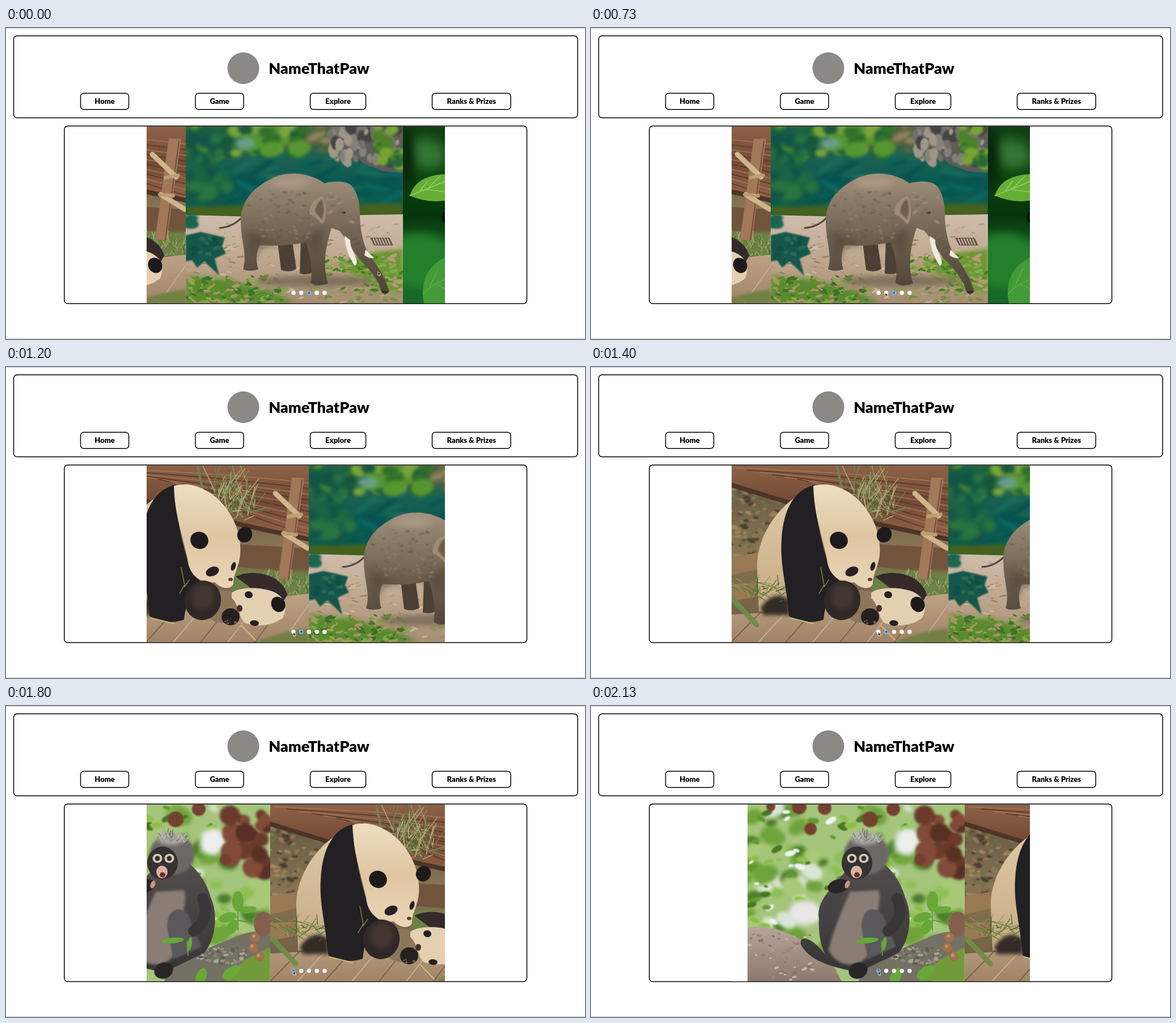
An HTML page with a canvas that plays this animation: 1021x549 px, repeating every 2.19 s.

```html
<!DOCTYPE html>
<html lang="en">
<head>
<meta charset="utf-8">
<title>NameThatPaw</title>
<style>
  html, body { margin: 0; width: 100%; height: 100%; overflow: hidden; background: #fff; }
  svg, canvas { position: absolute; left: 0; top: 0; }
  canvas { left: 248px; top: 174px; }
  .box { fill: #fff; stroke: #000; stroke-width: 1.5; }
  text { font: 900 13px Lato, sans-serif; text-anchor: middle; }
  .title { font-size: 27px; }
</style>
</head>
<body>
<svg width="1021" height="549">
  <path d="M0 .5H1021M0 548.5H1021" stroke="#c4c4c4"/>
  <rect class="box" x="13.5" y="13.8" width="994.5" height="144.7" rx="6"/>
  <circle cx="418.5" cy="71" r="28" fill="#8b8985"/>
  <text class="title" x="552" y="81">NameThatPaw</text>
  <g id="nav"></g>
  <rect class="box" x="102.8" y="173" width="815.7" height="313.5" rx="6"/>
</svg>
<canvas id="stage" width="526" height="312"></canvas>
<svg width="1021" height="549">
  <g id="dots"></g>
  <path id="cursor" d="M0 0V7L1.7 5.5 2.8 8 4 7.4 2.9 5H5Z" fill="#111" stroke="#fff" stroke-width=".8"/>
</svg>
<script>
const LOOP = 2190, STEP = 200 / 3, SLIDE_W = 383, TOP = 174;
const $ = id => document.getElementById(id);

$("nav").innerHTML = [["Home", 131.5, 85], ["Game", 334, 85], ["Explore", 536.5, 98], ["Ranks &amp; Prizes", 751.5, 138.5]]
  .map(([label, x, w]) => `<rect class="box" x="${x}" y="115.2" width="${w}" height="28.6" rx="5.5"/>
    <text x="${x + w / 2}" y="134">${label}</text>`).join("");

function randomFrom(seed) {
  return () => (seed = (seed * 16807) % 2147483647) / 2147483647;
}

// Paints one slide in stage coordinates and returns it as an image.
function slide(left, paint) {
  const image = document.createElement("canvas");
  image.width = SLIDE_W;
  image.height = 312;
  const g = image.getContext("2d"), rnd = randomFrom(left * 97);
  g.translate(-left, -TOP);
  g.lineCap = "round";
  const between = (a, b) => a + rnd() * (b - a);
  const blur = px => g.filter = px ? `blur(${px}px)` : "none";
  const p = {
    fill(color, d, soft = 0) { blur(soft); g.fillStyle = color; g.fill(new Path2D(d)); },
    line(color, width, d) { blur(0); g.strokeStyle = color; g.lineWidth = width; g.stroke(new Path2D(d)); },
    oval(color, x, y, rx, ry = rx, turn = 0, soft = 0) {
      blur(soft);
      g.fillStyle = color;
      g.beginPath();
      g.ellipse(x, y, rx, ry, turn, 0, 7);
      g.fill();
    },
    fade(y0, y1, ...colors) {
      const gradient = g.createLinearGradient(0, y0, 0, y1);
      colors.forEach((c, i) => gradient.addColorStop(i / (colors.length - 1), c));
      return gradient;
    },
    specks(n, [x0, y0, x1, y1], size, flat, colors, soft = 0) {
      for (let i = 0; i < n; i++) {
        const r = between(size / 3, size);
        p.oval(colors[i % colors.length], between(x0, x1), between(y0, y1), r, r * flat, between(-.6, .6), soft);
      }
    },
    blades(n, [x0, y0, x1, y1], dx, dy, colors) {
      for (let i = 0; i < n; i++)
        p.line(colors[i % colors.length], between(.7, 2),
          `M${between(x0, x1)} ${between(y0, y1)}l${between(-dx, dx)} ${between(-dy, 0)}`);
    }
  };
  paint(p);
  return image;
}

const monkey = slide(274, p => {
  p.fill("#a5c57c", "M274 174H657V486H274Z");
  p.specks(110, [274, 180, 657, 440], 24, .7, ["#6fa33c", "#8fbf52", "#d9e6d4", "#4c7f2a", "#a8c978"], 3);
  p.specks(80, [274, 178, 580, 390], 11, .5, ["#5f9a2e", "#8cc048", "#eef3ee", "#477824"], 1);
  p.oval("#eceeec", 555, 240, 22, 24, .4, 4);
  p.oval("#e8e6e6", 375, 365, 28, 22, 0, 4);
  p.specks(26, [580, 180, 655, 300], 20, 1, ["#6b3a2c", "#824a38", "#593024"], 2);
  [[385, 217, 11], [490, 200, 14], [531, 182, 12], [365, 178, 13], [410, 180, 12], [578, 271, 10], [315, 178, 8]]
    .forEach(([x, y, r]) => p.oval("#74402f", x, y, r, r, 0, 1));
  p.fill(p.fade(385, 486, "#b8a79b", "#8d786c"), "M274 392C320 378 390 420 424 455L440 486H274Z");
  p.specks(50, [278, 402, 390, 484], 5, .5, ["#9a887d", "#c5b6aa", "#87756b"]);
  p.fill("#747064", "M470 486L476 462Q550 425 595 408Q630 392 657 402V430L600 486Z");
  p.specks(60, [530, 425, 625, 455], 5, .5, ["#8f8a7b", "#5e5b50", "#aaa596"]);
  p.fill("#719b3b", "M575 486L610 450 657 425V486Z", 1);
  p.oval("#82604d", 645, 385, 17, 22);

  p.fill(p.fade(260, 460, "#55504f", "#393638"),
    "M450 288C425 318 394 345 400 375Q398 415 412 440C385 404 364 406 368 421C380 445 412 460 470 470L540 436C562 412 565 365 552 338C545 310 525 285 510 275Z");
  p.fill("#8a7d75", "M455 328C440 360 425 397 417 430C430 462 473 465 488 438C486 405 515 350 505 325Z", 2);
  p.fill("#5b585c", "M475 390C475 352 505 352 514 372L536 425 486 447Z", 1);
  p.line("#39363a", 20, "M538 340Q552 375 522 397");
  p.line("#454144", 18, "M443 318Q420 342 413 375");
  p.oval("#6d6866", 484, 262, 40, 36, 0, 2);
  p.oval("#aaa9a1", 482, 234, 25, 11, 0, 3);
  p.blades(35, [460, 232, 508, 240], 12, 18, ["#bab9b0", "#797770"]);
  p.oval("#353234", 467, 277, 27, 29);
  [458, 479].forEach(x => {
    p.oval("#d6cbb8", x, 269, 8.5, 8);
    p.oval("#392f2c", x, 269, 4.5);
  });
  p.oval("#d6b1a1", 466, 293, 10, 11);
  p.oval("#702f28", 467, 298, 5, 4.5);
  p.oval("#292628", 434, 318, 19, 12, -.3);
  p.oval("#c99779", 450, 315, 4, 7, .4);
  p.oval("#272528", 469, 467, 17, 14, -.4);
  p.line("#689440", 2, "M512 440L510 415M600 395L600 335M600 372L570 378M600 378L630 384");
  [[485, 414, 20, 5, -.1], [515, 420, 4, 12, .2], [600, 345, 10, 18, 0], [582, 373, 16, 8, -.3], [618, 360, 15, 6, -.2], [590, 390, 9, 14, .5], [535, 478, 9, 16, .4], [588, 470, 18, 9, -.6]]
    .forEach(a => p.oval("#67a838", ...a));
  [[630, 409], [627, 427], [638, 443]].forEach(([x, y]) => {
    p.oval("#a1704d", x, y, 8.5);
    p.oval("#bd9964", x - 2, y - 3, 3);
  });
});

const panda = slide(353, p => {
  p.fill(p.fade(210, 430, "#695744", "#877452", "#756247"), "M353 174H736V486H353Z");
  p.specks(180, [353, 215, 480, 335], 8, .5, ["#4b4031", "#8b7656", "#697046", "#a2845e"], 1);
  p.fill(p.fade(174, 300, "#8d6248", "#744a35", "#926347"), "M353 174H736V302L600 270 440 238 353 209Z");
  for (let i = 0; i < 10; i++)
    p.line(i % 2 ? "#543725" : "#a17559", 1.5, `M${360 + i * 22} ${178 + i * 4}Q600 ${188 + i * 8} 736 ${205 + i * 10}`);
  p.line("#4d3428", 8, "M353 208L450 238 620 279 736 304");
  p.fill("#72543d", "M610 313L736 320V365L610 353Z");
  p.fill("#6d8046", "M600 360H736V405H600Z", 3);
  p.blades(90, [650, 370, 736, 405], 9, 18, ["#829959", "#566d36", "#9bac67"]);
  p.fill("#997854", "M353 336L430 322V350L353 368ZM353 385L420 374V402L353 414Z");
  p.fill(p.fade(405, 486, "#bba083", "#a18467"), "M353 437L480 430 736 400V486H353Z");
  for (let i = 0; i < 9; i++)
    p.line(i % 2 ? "#c6ac91" : "#7d634a", 2, `M${353 + i * 48} 486L${405 + i * 48} ${433 - i * 3}`);
  p.fill("#728044", "M640 486Q690 466 736 462V486Z", 2);
  p.blades(110, [560, 215, 640, 274], 34, 50, ["#758650", "#99a268", "#586d3d", "#b2ae79"]);
  p.line("#708052", 4, "M540 174L552 235");
  p.fill("#a2775a", "M706 195L728 196 702 376 682 373Z");
  p.line("#755039", 2, "M724 200L700 374");
  p.line("#cdb58c", 9, "M677 223L719 263M692 294L734 320");
  p.line("#bd9e73", 6, "M700 264L723 260M690 294L714 296");

  p.fill(p.fade(225, 435, "#dfc9a7", "#c4aa83"), "M474 225C425 255 397 310 399 355L402 431Q430 438 455 435V320Z");
  p.fill("#332b25", "M405 425Q430 390 456 412V438H410Z", 3);
  p.blades(40, [375, 380, 455, 415], 45, 28, ["#657a3a", "#91985a", "#495d2c"]);
  p.line("#708b48", 9, "M356 410L398 455");
  p.fill("#222023", "M501 208C465 216 445 250 442 305C439 350 451 385 455 440Q484 457 516 446C520 415 526 397 548 385L522 340C505 285 503 250 501 208Z");
  p.fill(p.fade(205, 390, "#efdfc0", "#dfc6a2", "#ead5b6"),
    "M498 210C535 199 570 224 587 245Q613 278 615 315C618 348 602 363 603 383C598 394 582 392 570 380C546 384 524 367 522 338C513 294 500 266 498 210Z");
  p.oval("#1d1a1c", 543, 306, 16, 15, .5);
  p.oval("#1d1a1c", 623, 296, 13, 14, .5);
  p.oval("#252022", 566, 361, 12, 8, -.4);
  p.oval("#252022", 603, 352, 4, 8, .3);
  p.oval("#58433a", 598, 375, 4, 3);
  p.fill("#35292a", "M607 370C640 354 690 368 698 402L685 425 640 395Z");
  p.oval("#8d775c", 585, 423, 34, 29);
  p.oval("#302828", 549, 412, 32, 35, .2);
  p.oval("#443733", 550, 405, 20, 23, .2, 4);
  p.fill("#e4d0b1", "M600 399C607 391 637 388 656 392C691 397 702 420 690 443Q663 463 627 453C612 448 615 421 600 408Z");
  p.oval("#1d191a", 682, 419, 12, 14, -.5);
  p.oval("#242021", 630, 402, 7, 6, .2);
  p.oval("#242021", 640, 452, 8, 5, .1);
  p.oval("#3c302e", 614, 426, 5, 6);
  p.oval("#251f20", 598, 441, 16, 15);
  p.specks(6, [588, 447, 608, 453], 3, 1, ["#6f5b50"]);
  p.line("#d3b976", 2, "M458 443L498 453M618 457L642 482");
  p.line("#857b43", 1.5, "M511 354L517 385 508 400M525 376L517 388");
});

const elephant = slide(317, p => {
  p.fill(p.fade(174, 330, "#69613d", "#1d6251", "#075753", "#126349"), "M317 174H700V334H317Z");
  p.specks(40, [440, 174, 590, 215], 25, .35, ["#6e6742", "#93805d", "#5b6239", "#39643f"], 3);
  p.specks(35, [400, 225, 700, 305], 35, .16, ["#0b6864", "#08514f", "#196a59"], 3);
  p.fill("#46611f", "M317 315L700 310V335H317Z", 3);
  p.fill("#5e5b59", "M574 174H700V256L665 253 630 239 610 219 571 218Z");
  p.specks(60, [575, 176, 698, 235], 9, 1.5, ["#85807a", "#444442", "#74706a", "#a09788"], 1);
  p.fill(p.fade(330, 486, "#cfbdab", "#bfa78e", "#a58d71"), "M317 330L430 333 700 329V486H317Z");
  p.specks(240, [317, 345, 700, 484], 7, .25, ["#b19a80", "#d0baa1", "#9b8369", "#c0aa91"]);
  p.fill("#6d9736", "M570 419L650 396 700 390V468L655 462 625 440Z", 3);
  p.fill("#598a2e", "M317 437L390 445 465 463 510 486H317Z", 4);
  p.specks(170, [535, 400, 700, 466], 8, .4, ["#689936", "#84aa48", "#477d25", "#b49b77"]);
  p.specks(150, [317, 438, 490, 486], 8, .4, ["#5d8e2c", "#87aa47", "#3e7028", "#a99367"]);
  p.specks(30, [565, 465, 690, 486], 9, .3, ["#6d9040", "#9d9265"]);
  for (let i = 0; i < 7; i++) p.line("#554a40", 2, `M${645 + i * 5} 371l5 12`);
  p.line("#554a40", 1, "M643 371H676L682 383H650Z");

  p.specks(70, [317, 174, 525, 222], 21, .7, ["#2f712a", "#559631", "#18563d", "#79a53c"], 3);
  p.specks(45, [317, 185, 390, 300], 20, .9, ["#125347", "#1b6448", "#2a7440"], 4);
  p.oval("#6b9e8b", 421, 204, 18, 10, 0, 4);
  p.specks(24, [655, 174, 700, 245], 15, .7, ["#4c8229", "#76a431", "#286539"], 2);
  p.fill("#15574b", "M317 366L343 360 365 365 386 370 381 385 388 398 368 407 376 437 350 412 337 423 328 410 317 412Z", 1);
  p.specks(15, [322, 370, 375, 400], 7, .7, ["#286b55", "#124c43"], 1);
  p.specks(14, [317, 335, 332, 350], 10, .7, ["#1c6650"], 2);

  p.line("#51483f", 3, "M418 332Q402 351 377 353");
  p.oval("#81705e", 545, 447, 105, 10, 0, 5);
  p.fill("#4b4035", "M478 370H504L512 425Q500 433 485 427ZM520 370H546L542 431Q530 437 518 433Z");
  p.fill(p.fade(257, 453, "#a0907c", "#756754", "#51463a"),
    "M414 345C412 300 445 274 480 261C513 251 546 262 561 274Q594 267 608 277C621 290 625 314 624 336Q627 385 645 406Q665 432 676 465L668 471 661 464Q658 442 622 407C608 388 599 371 588 358L574 353C565 381 557 417 568 451Q551 458 537 450C542 424 535 397 529 378Q488 387 447 383C439 400 442 416 445 426Q430 431 418 426C426 402 415 379 414 345Z");
  p.fill("#594c3f", "M425 355Q480 394 530 371L560 350 551 405 533 378 445 384 434 418Z", 7);
  p.oval("#aa9985", 500, 273, 35, 9, 0, 6);
  p.specks(100, [425, 285, 540, 372], 4, .35, ["#6f6251", "#8d7e69", "#62584a"], 1);
  p.fill("#a18b77", "M558 297C540 302 533 319 536 329Q546 332 558 347C567 334 566 312 558 297Z");
  p.fill("#6e5e50", "M557 302C550 306 545 318 545 325L557 338C562 327 561 312 557 302Z", 1);
  p.oval("#3d342d", 595, 326, 4, 2);
  p.specks(25, [570, 285, 615, 350], 6, .4, ["#7b6c5c", "#9b8b78"], 1);
  for (let i = 0; i < 10; i++) p.line("#5b5047", 1, `M${609 + i * 5} ${375 + i * 8}l11 -5`);
  p.fill("#f1e9dc", "M597 367Q598 394 615 420Q623 417 614 399Q606 383 607 374ZM634 391L649 406Q641 408 632 401Z");
  p.line("#302b27", 4, "M665 466H672");
});

const leaves = slide(700, p => {
  p.fill(p.fade(174, 486, "#123e15", "#0d4511", "#06340b", "#176825", "#17682a"), "M700 174H1083V486H700Z");
  p.oval("#347635", 741, 222, 35, 26, .2, 10);
  p.oval("#08280b", 705, 230, 15, 55, 0, 8);
  p.oval("#247f2d", 727, 410, 65, 48, 0, 8);
  p.fill("#64ae35", "M712 296Q723 260 774 258H1083V305H770Q742 309 712 296Z");
  p.line("#9bcb62", 1.5, "M712 296Q745 283 774 271M730 288L743 271M746 281L765 262M740 285L774 289");
  p.oval("#10110d", 775, 334, 7, 10);
  p.fill("#439b37", "M735 475Q732 425 774 405H1083V486H737Z");
  p.line("#75b953", 1, "M735 470Q750 453 774 444M747 457L762 425M755 451L774 460");
});

const slides = [monkey, panda, elephant, leaves];
const stage = $("stage").getContext("2d");

// Time in ms and left edge of the third slide.
const scroll = [[0, 317], [740, 317], [930, 406], [1200, 534], [1460, 659], [1600, 736], [1800, 849], [2190, 1075]];

function scrollAt(t) {
  const i = scroll.findIndex(([time]) => time > t);
  const [t0, x0] = scroll[i - 1], [t1, x1] = scroll[i];
  return x0 + (x1 - x0) * (t - t0) / (t1 - t0);
}

function cursorAt(t) {
  const ease = u => u * u * (3 - 2 * u), part = (a, b) => ease(Math.min(1, Math.max(0, (t - a) / (b - a))));
  const u = part(0, 530), v = 1 - u;
  return [656 * v * v + 1270 * u * v + 519 * u * u - 12.5 * part(740, 930),
          430 * v * v + 960 * u * v + 467 * u * u + part(740, 930)];
}

function drawDots(selected) {
  $("dots").innerHTML = slides.concat(0).map((_, i) => {
    const at = `cx="${507 + i * 13.7}" cy="467.5"`;
    return `<circle ${at} r="3.7" fill="#fff"/>` + (i === selected
      ? `<circle ${at} r="3.1" fill="none" stroke="#2878c8"/><circle ${at} r="2" fill="#0b65c2"/>` : "");
  }).join("");
}

function frame() {
  // The picture advances at 15 steps per second.
  const t = Math.floor((performance.now() % LOOP + 4) / STEP) * STEP;
  const left = scrollAt(Math.min(t, LOOP - 1)) - 2 * SLIDE_W - 248;
  stage.fillStyle = "#fff";
  stage.fillRect(0, 0, 526, 312);
  slides.forEach((image, i) => stage.drawImage(image, Math.round(left + i * SLIDE_W), 0));
  drawDots(t < 740 ? 2 : t < 1460 ? 1 : 0);
  $("cursor").setAttribute("transform", `translate(${cursorAt(t)})`);
  requestAnimationFrame(frame);
}
frame();
</script>
</body>
</html>
```
